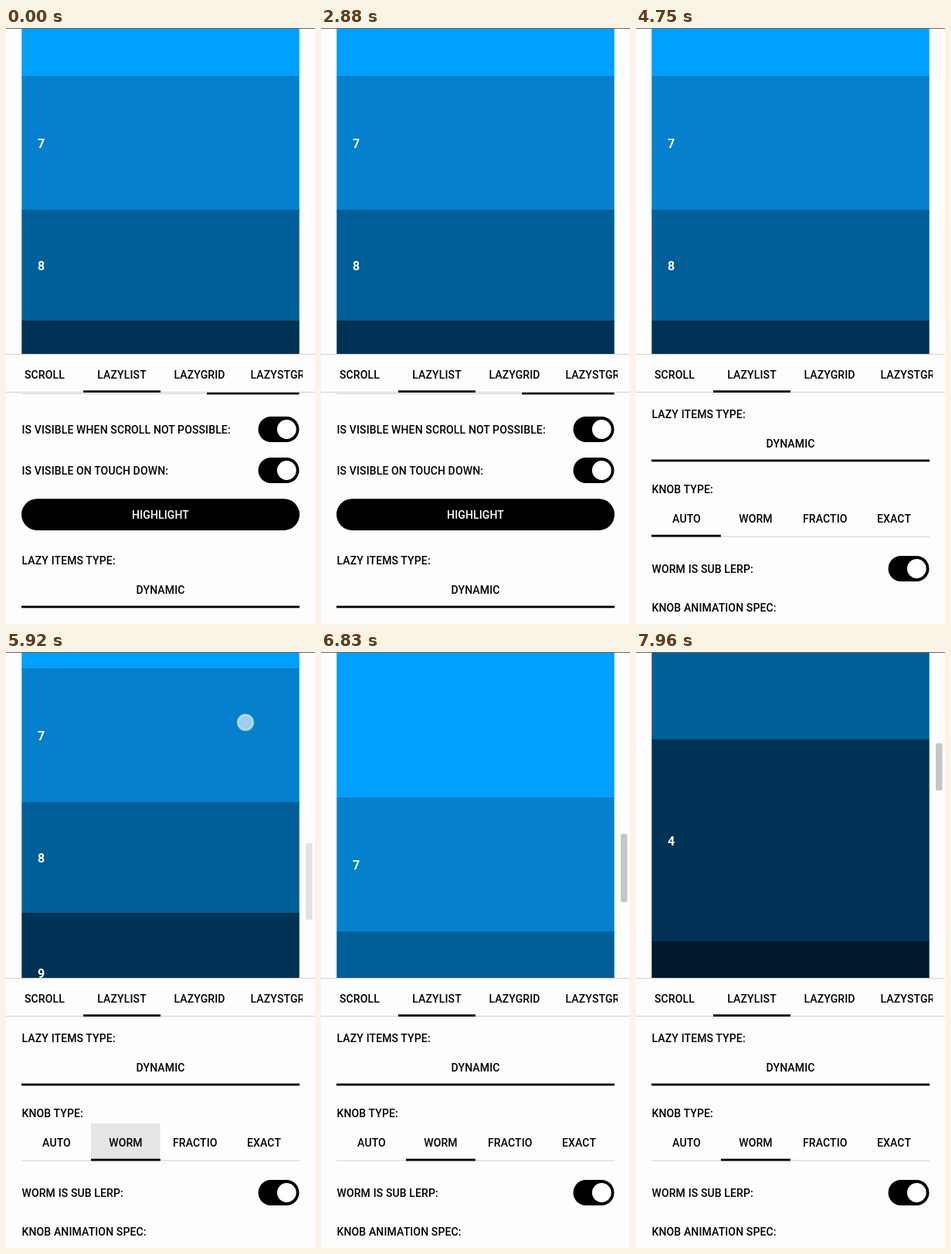
An HTML page that plays this animation: 400x770 px, repeating every 8 s.

```html
<!DOCTYPE html>
<html lang="en">
<head>
<meta charset="utf-8">
<title>Scrollbar settings</title>
<style>
  html, body { margin: 0; width: 100%; height: 100%; overflow: hidden; background: #fdfdfe; }
  svg { display: block; width: 400px; height: 770px; }
  text { font: 500 14px Roboto, "Open Sans", sans-serif; letter-spacing: .13px; fill: #000; }
  .num { font-weight: 700; font-size: 16px; letter-spacing: 0; fill: #fff; }
  .mid { text-anchor: middle; }
  .inv { fill: #fff; }
</style>
</head>
<body>
<svg id="stage" viewBox="0 0 400 770">
  <defs>
    <clipPath id="listClip"><rect width="400" height="421"/></clipPath>
    <clipPath id="panelClip"><rect y="471" width="400" height="299"/></clipPath>
    <clipPath id="tabClip"><rect x="316" y="430" width="68" height="40"/></clipPath>
    <clipPath id="knobClip"><rect x="216" y="805" width="57.5" height="40"/></clipPath>
    <clipPath id="rowClip"><rect x="20" y="701" width="360" height="46"/></clipPath>
    <clipPath id="wormClip"><rect x="110" y="798" width="89.5" height="47"/></clipPath>
    <radialGradient id="ripple">
      <stop offset=".5" stop-color="#dadada"/>
      <stop offset="1" stop-color="#dadada" stop-opacity="0"/>
    </radialGradient>
  </defs>
</svg>
<script>
const LOOP = 8000, FPS = 24;
const INK = '#000', HAIR = '#d0d0d0';
const stage = document.getElementById('stage');

function add(parent, tag, attrs, content) {
  const el = document.createElementNS('http://www.w3.org/2000/svg', tag);
  set(el, attrs);
  if (content !== undefined) el.textContent = content;
  parent.appendChild(el);
  return el;
}
function set(el, attrs) {
  for (const k in attrs) el.setAttribute(k, attrs[k]);
}
const group = (parent, attrs = {}) => add(parent, 'g', attrs);
const rect = (p, x, y, width, height, fill, rx = 0) => add(p, 'rect', { x, y, width, height, fill, rx });
// y is the vertical centre of the capitals
const label = (p, x, y, s, cls = '') => add(p, 'text', { x, y: y + 5, class: cls }, s);

function toggle(p, y) {
  rect(p, 326.5, y, 53, 33, INK, 16.5);
  add(p, 'circle', { cx: 363.3, cy: y + 16.5, r: 12.4, fill: '#fff' });
}

// Coloured list: heights of items 3 to 10, item 7 starts at y = 62
const heights = [300, 261, 220, 410, 173, 143, 155, 200];
const colors = ['#005f98', '#003255', '#00192b', '#00a0ff', '#0480cc'];
const list = group(group(stage, { 'clip-path': 'url(#listClip)' }));
let top0 = 62 - heights.slice(0, 4).reduce((a, b) => a + b);
heights.forEach((h, i) => {
  rect(list, 20.3, top0, 359.4, h + .5, colors[i % 5]);
  label(list, 41, top0 + h / 2 + 1.6, i + 3, 'num');
  top0 += h;
});
const thumb = rect(stage, 388, 0, 8.5, 0, '#c6c6c6', 2);
rect(stage, 0, 0, 400, 1, '#666');

// Settings panel
const panel = group(group(stage, { 'clip-path': 'url(#panelClip)' }));
rect(panel, 20, 472, 360, 1, HAIR);
rect(panel, 260, 470.5, 119.5, 3, INK);
label(panel, 20.5, 519, 'IS VISIBLE WHEN SCROLL NOT POSSIBLE:');
toggle(panel, 502);
label(panel, 20.5, 572, 'IS VISIBLE ON TOUCH DOWN:');
toggle(panel, 555);
rect(panel, 20, 608.3, 360, 40.6, INK, 20.3);
label(panel, 200, 629, 'HIGHLIGHT', 'mid inv');
label(panel, 20.5, 688, 'LAZY ITEMS TYPE:');

const rowRipple = add(group(panel, { 'clip-path': 'url(#rowClip)' }), 'circle',
  { cx: 247, cy: 724, fill: 'url(#ripple)' });
label(panel, 200, 726, 'DYNAMIC', 'mid');
rect(panel, 20, 746.5, 360, 2.8, INK);

label(panel, 20.5, 784.5, 'KNOB TYPE:');
const wormRipple = add(group(panel, { 'clip-path': 'url(#wormClip)' }), 'circle',
  { cx: 155, cy: 822, fill: '#e5e5e5' });
[['AUTO', 65.5], ['WORM', 155], ['EXACT', 334]].forEach(([s, x]) => label(panel, x, 822.5, s, 'mid'));
label(group(panel, { 'clip-path': 'url(#knobClip)' }), 216, 822.5, 'FRACTION');
rect(panel, 20, 845.5, 360, 1, HAIR);
const knobLine = rect(panel, 20, 843.7, 89.8, 2.8, INK);
label(panel, 20.5, 887.5, 'WORM IS SUB LERP:');
toggle(panel, 871);
label(panel, 20.5, 938, 'KNOB ANIMATION SPEC:');

// Main tabs
rect(stage, 0, 421, 400, 1, HAIR);
rect(stage, 0, 470, 400, 1, HAIR);
[['SCROLL', 50], ['LAZYLIST', 150], ['LAZYGRID', 250.5]].forEach(([s, x]) => label(stage, x, 447.5, s, 'mid'));
label(group(stage, { 'clip-path': 'url(#tabClip)' }), 316.5, 447.5, 'LAZYSTGRID');
rect(stage, 100, 468.2, 100, 2.8, INK);

const finger = group(stage);
add(finger, 'circle', { r: 11.6, fill: 'none', stroke: '#777', 'stroke-opacity': .35 });
add(finger, 'circle', { r: 10, fill: '#fff', 'fill-opacity': .62, stroke: '#fff', 'stroke-opacity': .5, 'stroke-width': 2.4 });

// Motion helpers
const ramp = (t, a, b) => Math.min(1, Math.max(0, (t - a) / (b - a)));
const smooth = x => x * x * (3 - 2 * x);
const easeOut = x => 1 - (1 - x) ** 3;
const mix = (a, b, x) => a + (b - a) * x;
const pulse = (t, a, b, fade) => ramp(t, a, a + fade) - ramp(t, b, b + fade);

const panelScroll = t => Math.round(189 * easeOut(ramp(t, 4050, 4840)));

// Drag up, drag back down, then a long fling
const listShift = t =>
  -70 * smooth(ramp(t, 5740, 6057)) +
  196 * smooth(ramp(t, 6200, 6800)) +
  820 * smooth(ramp(t, 7000, 8000));

const touches = [
  { from: 3950, to: 4400, at: t => [261, 688 - panelScroll(t)] },
  { from: 5330, to: 5450, at: () => [155, 634] },
  { from: 5700, to: 6740, at: t => [310, 132 + listShift(t)] },
  { from: 6980, to: 7330, at: t => [310, listShift(t) - 16] }
];

function draw(t) {
  const shift = listShift(t);
  set(list, { transform: `translate(0 ${shift})` });
  set(panel, { transform: `translate(0 ${-panelScroll(t)})` });

  // The thumb shrinks and climbs as the list nears its taller items
  const worm = smooth(ramp(t, 5400, 5640));
  set(thumb, {
    y: mix(234, 244.4 - .0657 * shift - 7.27e-5 * shift ** 2, worm),
    height: mix(144, 96.1 - .0687 * shift + 3.34e-5 * shift ** 2, worm),
    opacity: pulse(t, 1760, 2670, 200) + pulse(t, 3100, 4070, 200)
      + .5 * ramp(t, 5640, 5760) + .5 * ramp(t, 5930, 6100)
  });

  set(rowRipple, { r: 74 * ramp(t, 3960, 4160), opacity: 1 - ramp(t, 4170, 4400) });
  set(wormRipple, { r: 60 * ramp(t, 5340, 5520), opacity: 1 - ramp(t, 6000, 6300) });
  set(knobLine, { x: mix(20, 110, worm) });

  const touch = touches.find(k => t < k.to + 50) || touches[0];
  set(finger, {
    transform: `translate(${touch.at(t)})`,
    opacity: pulse(t, touch.from, touch.to, 40)
  });
}

// The picture advances at a fixed frame rate
const start = performance.now();
function tick() {
  const t = (performance.now() - start) % LOOP;
  draw(Math.floor(t * FPS / 1000 + .2) * 1000 / FPS);
  requestAnimationFrame(tick);
}
tick();
</script>
</body>
</html>
```
